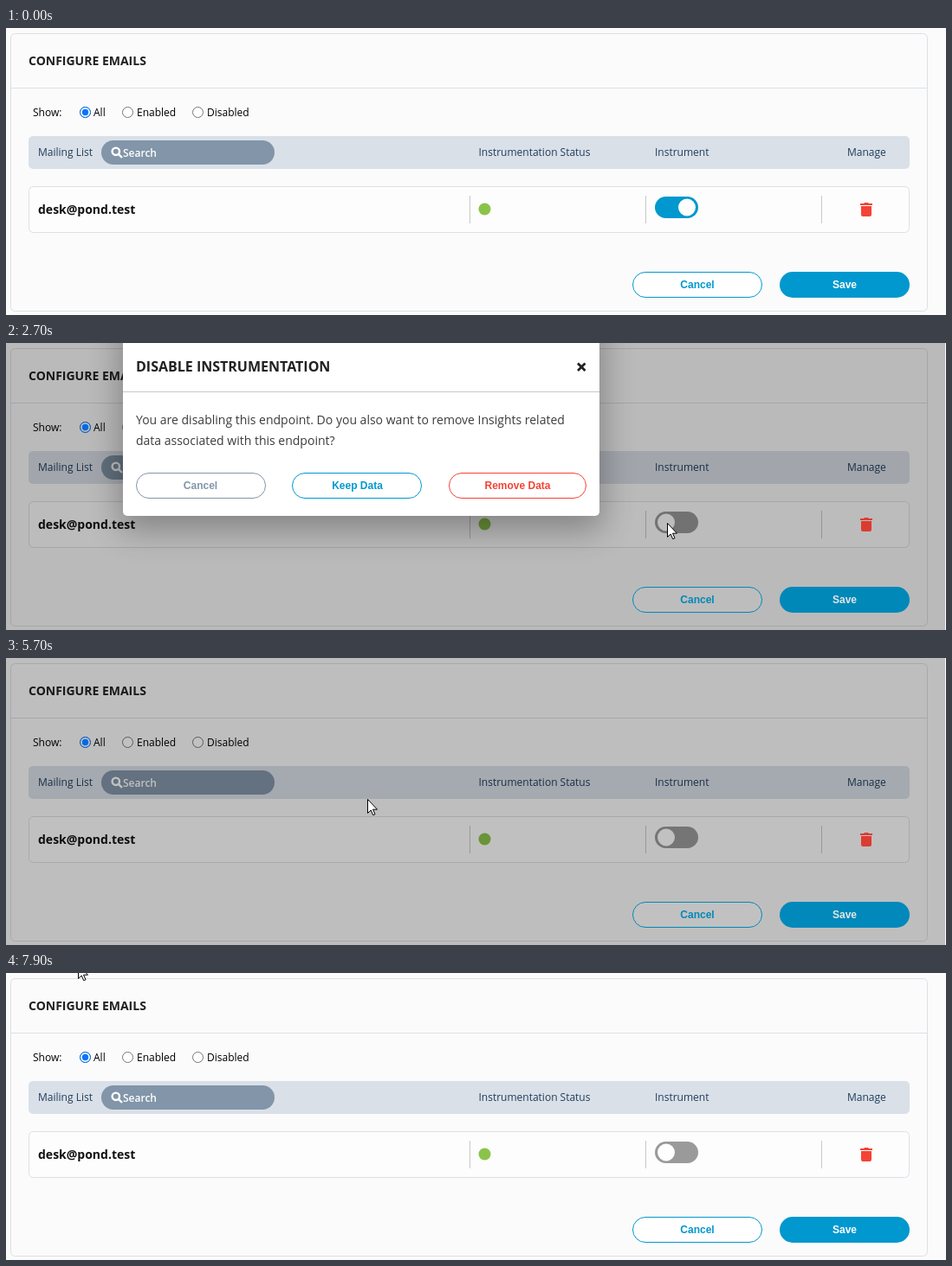
These frames come from a looping animation (1085 by 332 pixels, 8000 ms). An HTML page:

```html
<!DOCTYPE html>
<html lang="en">
<head>
<meta charset="utf-8">
<title>Configure emails</title>
<style>
html, body { margin: 0; width: 100%; height: 100%; overflow: hidden; background: #fbfbfb; }
svg { display: block; }
text { font: 12px "Open Sans", sans-serif; }
.head { font-weight: 700; font-size: 14px; fill: #212121; }
.col text { fill: #1f3d5c; }
.btn { font: 700 12px "Liberation Sans", Arial, sans-serif; text-anchor: middle; }
.body { font-size: 14px; fill: #3c3c3c; }
.line { fill: none; stroke: #dcdfe7; }
.ring { fill: #fff; stroke: #767676; }
.blue { fill: #0098ce; }
.edge { fill: none; stroke: #0098ce; }
.shadow { filter: blur(19px); opacity: .3; }
</style>
</head>
<body>
<svg width="1085" height="332" viewBox="0 0 1085 332">
  <!-- page -->
  <rect width="1085" height="332" fill="#fbfbfb"/>
  <rect class="line" x="5.5" y="6.5" width="1058" height="321" rx="5"/>
  <path class="line" d="M6 69.5H1063"/>
  <text class="head" x="26" y="43">CONFIGURE EMAILS</text>
  <text x="31" y="102">Show:</text>
  <text x="101" y="102">All</text>
  <text x="151" y="102">Enabled</text>
  <text x="232" y="102">Disabled</text>
  <circle class="ring" cx="91.5" cy="97.5" r="6"/>
  <circle class="ring" cx="140.5" cy="97.5" r="6"/>
  <circle class="ring" cx="221.5" cy="97.5" r="6"/>

  <g class="col">
    <rect x="26" y="125" width="1017" height="38" rx="5" fill="#dae0e8"/>
    <text x="37" y="148">Mailing List</text>
    <text x="545.5" y="148">Instrumentation Status</text>
    <text x="749" y="148">Instrument</text>
    <text x="971" y="148">Manage</text>
  </g>
  <rect x="110" y="130" width="200" height="28" rx="14" fill="#8295a9"/>
  <g fill="none" stroke="#fff" stroke-width="2.4">
    <circle cx="126.8" cy="142.8" r="4.2"/>
    <path d="M129.8 145.8L134 150"/>
  </g>
  <text x="135" y="149" fill="#fff" font-weight="600" style="font-weight:600">Search</text>

  <rect x="26.5" y="183.5" width="1016" height="53" rx="5" fill="#fdfdfd" stroke="#dcdfe7"/>
  <text class="head" x="37" y="215" style="fill:#111">desk@pond.test</text>
  <path d="M535.5 194v32M738.5 194v32M941.5 194v32" stroke="#c8c8c8"/>
  <circle cx="552.5" cy="209.5" r="7" fill="#8bc34a"/>
  <rect id="track" x="749" y="195" width="50" height="25" rx="12.5"/>
  <circle id="knob" cy="207.5" r="10" fill="#fff"/>
  <rect x="723.5" y="282.5" width="149" height="29" rx="14.5" fill="#fff"/>

  <rect id="veil" width="1084" height="332"/>

  <!-- accents, only slightly dimmed by the veil -->
  <g id="accents">
    <circle cx="91.5" cy="97.5" r="6" fill="none" stroke="#0075ff"/>
    <circle cx="91.5" cy="97.5" r="3.7" fill="#0075ff"/>
    <path fill="#f44336" d="M986 203h4l1-1h4l1 1h4v2h-14zM987 206h12v10q0 2-2 2h-8q-2 0-2-2z"/>
    <rect class="edge" x="723.5" y="282.5" width="149" height="29" rx="14.5"/>
    <text class="btn blue" x="798" y="301">Cancel</text>
    <rect class="blue" x="893" y="282" width="150" height="30" rx="15"/>
    <text class="btn" x="968" y="301" fill="#fff">Save</text>
  </g>

  <g id="dialog">
    <rect class="shadow" x="132" y="-20" width="556" height="236"/>
    <rect x="135" y="-10" width="550" height="210" rx="5" fill="#fff"/>
    <text class="head" x="150" y="33" style="font-size:16px">DISABLE INSTRUMENTATION</text>
    <path d="M660 23.500l8.500 8.500m0-8.500l-8.500 8.500" stroke="#222" stroke-width="2.800"/>
    <path d="M135 56.500H685" stroke="#c8c8c8"/>
    <text class="body" x="150" y="94">You are disabling this endpoint. Do you also want to remove Insights related</text>
    <text class="body" x="150" y="118">data associated with this endpoint?</text>
    <g fill="none">
      <rect x="150.500" y="150.500" width="149" height="29" rx="14.500" stroke="#8295a9"/>
      <rect x="330.500" y="150.500" width="149" height="29" rx="14.500" stroke="#0098ce"/>
      <rect x="511.500" y="150.500" width="158" height="29" rx="14.500" stroke="#f44336"/>
    </g>
    <text class="btn" x="224.500" y="169" fill="#8295a9">Cancel</text>
    <text class="btn blue" x="405.500" y="169">Keep Data</text>
    <text class="btn" x="590.500" y="169" fill="#f44336">Remove Data</text>
  </g>

  <g fill="#fff" stroke="#000" stroke-linejoin="round">
    <path id="arrow" d="M.5 .5V16.500L4.200 13L6.700 18.700L9 17.700L6.500 12.200H11.500Z"/>
    <path id="hand" d="M3.500 2a1.700 1.700 0 0 1 3.400 0V9q1.700-1.200 3 .6q1.700-.8 2.600.8q2-.6 2.300 1.600V16q0 3-2 5v2H5.500v-2L.8 14.500q-1-2 .6-2.300q1 0 2.100 1.800Z"/>
  </g>
</svg>
<script>
const LOOP = 8000, STEP = 100, OPEN = 2600, CLOSE = 5700;
const $ = id => document.getElementById(id);

// time, x, y of the pointer
const pointer = [
  [200, 61, 14], [600, 420, 150], [800, 720, 168], [1000, 781, 160], [1500, 832, 143],
  [1600, 754, 163], [1700, 754, 163], [1900, 743, 200], [2100, 752, 225], [2300, 772, 212],
  [2400, 763, 208], [2700, 763, 208], [2800, 715, 210], [2900, 697, 211], [3000, 697, 211],
  [3600, 372, 145], [3700, 372, 145], [4000, 366, 176], [4200, 405, 172], [4300, 405, 172],
  [4600, 438, 172], [4900, 417, 163], [6100, 417, 163], [6200, 427, 171], [6300, 427, 171],
  [6700, 745, 189], [7200, 175, 2], [7300, 95, -4], [7400, 95, -4], [7600, 62, -12],
  [7700, 62, -20], [7800, 62, -20], [7900, 83, -10]
];
// time, opacity of the veil
const veil = [
  [2500, 0], [2600, .13], [2700, .26], [2800, .305], [2900, .325],
  [5600, .325], [5700, .245], [5800, .055], [5900, .015], [6000, 0]
];

function at(keys, t) {
  const i = keys.findIndex(k => k[0] > t);
  if (i < 0) return keys[keys.length - 1].slice(1);
  if (i === 0) return keys[0].slice(1);
  const a = keys[i - 1], b = keys[i], p = (t - a[0]) / (b[0] - a[0]);
  return a.slice(1).map((v, n) => v + (b[n + 1] - v) * p);
}

function show(el, on) {
  el.style.display = on ? "" : "none";
}

function draw(now) {
  const t = Math.floor(now % LOOP / STEP) * STEP;
  const [x, y] = at(pointer, t).map(Math.round);
  const [dim] = at(veil, t);
  const open = t >= OPEN && t < CLOSE;
  const on = t < OPEN;

  $("track").setAttribute("fill", on ? "#0098ce" : "#9a9a9a");
  $("knob").setAttribute("cx", on ? 786 : 762);
  $("veil").setAttribute("opacity", dim);
  $("accents").style.filter = dim ? `brightness(${1 - dim * .4})` : "none";

  const grow = Math.min(1, (t - OPEN + STEP) / 200);
  const scale = .7 + .3 * grow;
  show($("dialog"), open);
  $("dialog").setAttribute("opacity", Math.max(0, grow));
  $("dialog").setAttribute("transform", `translate(410 100) scale(${scale}) translate(-410 -100)`);

  const overButton = open && y >= 150 && y <= 180 &&
    [[150, 300], [330, 480], [511, 670]].some(([l, r]) => x >= l && x <= r);
  show($("arrow"), t >= 200 && !overButton);
  show($("hand"), overButton);
  $("arrow").setAttribute("transform", `translate(${x} ${y})`);
  $("hand").setAttribute("transform", `translate(${x - 3} ${y})`);

  requestAnimationFrame(draw);
}

const start = performance.now();
draw(0);
function tick() { draw(performance.now() - start); }
</script>
<script>
// every frame is drawn from the time since load
draw = (paint => () => paint(performance.now() - start))(draw);
</script>
</body>
</html>
```
